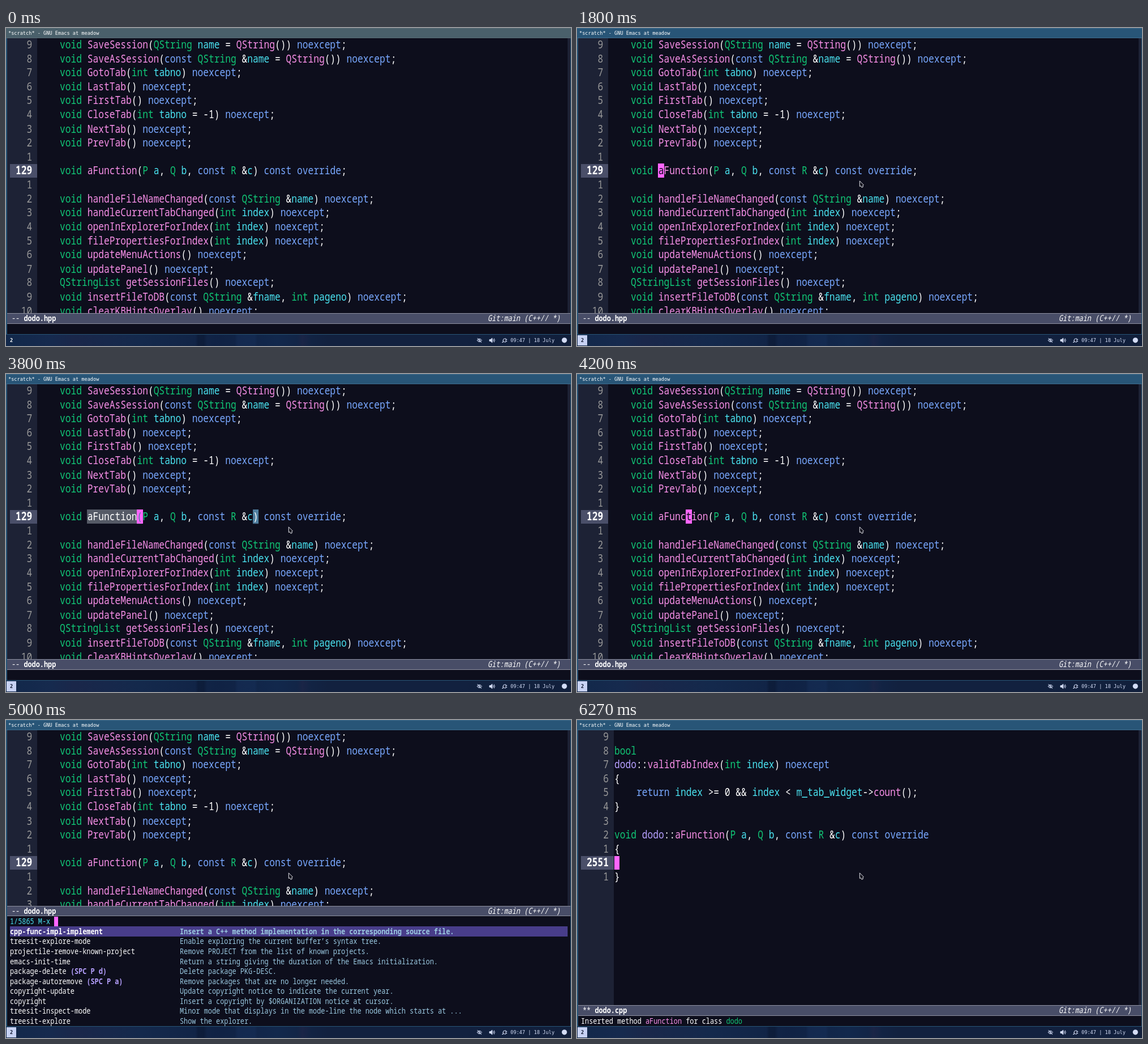
Write an HTML page that moves like this. It is 998x561 px and loops after 8 s.

```html
<!DOCTYPE html>
<html lang="en">
<head>
<meta charset="utf-8">
<title>Editor session</title>
<style>
@property --c { syntax: "<number>"; inherits: true; initial-value: 5; }

:root {
  --bg: #0d0e1c; --gutter: #1d2235; --active: #4a4f69; --frame: #285577;
  --caret: #ff66ff; --match: #4f7f9f;
  --w: 9.745px;      /* advance of one code character */
  --tall: 1.26;      /* narrow face: all editor text shares this ratio */
}
html, body { margin: 0; width: 100%; height: 100%; overflow: hidden; background: var(--bg); }
#stage { position: absolute; left: 0; top: 0; width: 998px; height: 561px; overflow: hidden; background: var(--bg); color: #fff; }
#stage div, #stage svg { position: absolute; white-space: pre; }
#stage * { font-variant-ligatures: none; }

.title { left: 0; top: 0; width: 998px; height: 18px; box-sizing: border-box;
  background: var(--frame); border: 1px solid #3d6a8b; border-width: 1px 0;
  font: 8.6px/16px "DejaVu Sans Mono", monospace; text-indent: 4px;
  animation: title 8s step-end infinite; }
.edge { top: 18px; height: 523px; width: 1.5px; background: var(--frame); }
.base { left: 0; top: 539.5px; width: 998px; height: 1.5px; background: var(--frame); }

.view { left: 1px; top: 18px; width: 996px; height: 522px; background: var(--bg); overflow: hidden; }
.view > .in { left: -1px; top: -18px; width: 998px; height: 561px; }
.gutter { left: 0; top: 18px; height: 486px; background: var(--gutter); }
.fringe { left: 992px; top: 18px; width: 6px; height: 486px; background: var(--gutter); }
.now { left: 7px; top: 240px; height: 24.4px; background: var(--active); }

.code { top: 17.4px; transform: scaleY(var(--tall)); transform-origin: 0 0;
  font: 16.242px/19.603px "Noto Sans Mono", "DejaVu Sans Mono", monospace; }
.nums { left: 0; text-align: right; color: #989898; }
.nums b { color: #fff; }
.sm { transform: scaleY(var(--tall)); transform-origin: 0 0;
  font: 11.88px/13.93px "Noto Sans Mono", "DejaVu Sans Mono", monospace; }
.bar { left: 1px; width: 996px; height: 18.5px; box-sizing: border-box;
  background: #484d67; border: 1px solid #8d90a0; border-width: 1px 0; }

.k { color: #79a8ff; } .t { color: #11c777; } .f { color: #f78fe7; }
.v { color: #4ae2f0; } .n { color: #b6a0ff; } .d { color: #9ac8e0; }

.line { left: 0; top: 176.43px; width: 600px; height: 19.603px; animation: walk 8s infinite; }
.line div { left: 0; top: 0; width: 600px; height: 19.603px; }
.line .pair { width: var(--w); background: var(--match); }
.pairs { animation: pairs 8s step-end infinite; }
.sel { background: #555a66; animation: sel 8s step-end infinite;
  clip-path: inset(0 calc(100% - var(--c) * var(--w)) 0 calc(5 * var(--w))); }
.caret { background: var(--caret); color: var(--bg);
  clip-path: inset(0 calc(100% - (var(--c) + 1) * var(--w)) 0 calc(var(--c) * var(--w)));
  animation: caret 8s step-end infinite, ink 8s step-end infinite; }
.block { background: var(--caret); }
.menu { animation: menu 8s step-end infinite; }
.done { animation: done 8s step-end infinite; }
.mouse { animation: mouse 8s step-end infinite; }

.tray { left: 0; top: 541px; width: 998px; height: 20px;
  font: 8.65px/20px "DejaVu Sans Mono", monospace; color: #d3dcf6;
  background:
    linear-gradient(90deg, #0000 33.5%, #08122966 34%, #08122966 35%, #0000 35.6%, #0000 40.5%, #1b376644 41%, #1b376644 44%, #0000 44.5%, #0000 51.5%, #2b254855 52.5%, #0000 54%),
    linear-gradient(90deg, #12284a, #162a4e 8%, #1a274a 12%, #14294c 24%, #102244 38%, #12284c 48%, #12213f 57%, #12213f 80%, #111f3b); }
.ws { left: 1px; top: 1px; width: 17px; height: 18px; line-height: 18px; text-align: center; font-weight: bold; }
.ws.on { background: #c8d3f5; animation: glow 8s infinite; }
.ws.num { animation: num 8s step-end infinite; }

@keyframes title { 0% { background-color: #4a606b; border-color: #586b74; } 5%, 100% { background-color: #285577; border-color: #3d6a8b; } }
@keyframes mouse { 0% { opacity: 0; } 1.75%, 100% { opacity: 1; } }
@keyframes num { 0% { color: #fff; } 5%, 100% { color: #0d1730; } }
@keyframes glow { 0%, 5% { opacity: 0; animation-timing-function: ease; } 10%, 100% { opacity: 1; } }
@keyframes walk {
  0% { --c: 5; }
  22.5% { --c: 5; animation-timing-function: steps(9); }
  30% { --c: 14; }
  47.5% { --c: 14; animation-timing-function: steps(3); }
  50% { --c: 11; }
  52.5% { --c: 11; animation-timing-function: steps(4, jump-both); }
  55.87%, 100% { --c: 6; }
}
@keyframes sel { 0% { opacity: 0; } 22.5% { opacity: 1; } 48.33%, 100% { opacity: 0; } }
@keyframes pairs { 0% { opacity: 0; } 30% { opacity: 1; } 52.5%, 100% { opacity: 0; } }
@keyframes ink { 0% { color: #0d0e1c; } 30% { color: #4f7f9f; } 48.33%, 100% { color: #0d0e1c; } }
@keyframes caret { 0% { opacity: 0; } 5% { opacity: 1; } 62.5% { opacity: 0; } 77.5%, 100% { opacity: 1; } }
@keyframes menu { 0% { opacity: 0; } 62.5% { opacity: 1; } 77.5%, 100% { opacity: 0; } }
@keyframes done { 0% { opacity: 0; } 78.37%, 100% { opacity: 1; } }
</style>
</head>
<body>
<div id="stage"></div>
<script>
const header = `void SaveSession(QString name = QString()) noexcept;
void SaveAsSession(const QString &name = QString()) noexcept;
void GotoTab(int tabno) noexcept;
void LastTab() noexcept;
void FirstTab() noexcept;
void CloseTab(int tabno = -1) noexcept;
void NextTab() noexcept;
void PrevTab() noexcept;

void aFunction(P a, Q b, const R &c) const override;

void handleFileNameChanged(const QString &name) noexcept;
void handleCurrentTabChanged(int index) noexcept;
void openInExplorerForIndex(int index) noexcept;
void filePropertiesForIndex(int index) noexcept;
void updateMenuActions() noexcept;
void updatePanel() noexcept;
QStringList getSessionFiles() noexcept;
void insertFileToDB(const QString &fname, int pageno) noexcept;
void clearKBHintsOverlay() noexcept;`;

const body = `
bool
dodo::validTabIndex(int index) noexcept
{
    return index >= 0 && index < m_tab_widget->count();
}

void dodo::aFunction(P a, Q b, const R &c) const override
{

}`;

const commands = [
  ["cpp-func-impl-implement", "", "Insert a C++ method implementation in the corresponding source file."],
  ["treesit-explore-mode", "", "Enable exploring the current buffer’s syntax tree."],
  ["projectile-remove-known-project", "", "Remove PROJECT from the list of known projects."],
  ["emacs-init-time", "", "Return a string giving the duration of the Emacs initialization."],
  ["package-delete", "(SPC P d)", "Delete package PKG-DESC."],
  ["package-autoremove", "(SPC P a)", "Remove packages that are no longer needed."],
  ["copyright-update", "", "Update copyright notice to indicate the current year."],
  ["copyright", "", "Insert a copyright by $ORGANIZATION notice at cursor."],
  ["treesit-inspect-mode", "", "Minor mode that displays in the mode-line the node which starts at ..."],
  ["treesit-explore", "", "Show the explorer."]
];

const esc = s => s.replace(/&/g, "&amp;").replace(/</g, "&lt;");
const span = (cls, s) => `<span class="${cls}">${s}</span>`;
const box = (cls, css, inner = "") => `<div class="${cls}" style="${css}">${inner}</div>`;

// Syntax colours: calls, class names, keywords, types, then variables.
function paint(src) {
  return src.replace(/([A-Za-z_]\w*)(\(|::)?|[&<]/g, (m, word, tail = "") => {
    if (!word) return esc(m);
    const cls = tail === "(" ? "f" : tail ? "n"
      : /^(const|noexcept|override|return)$/.test(word) ? "k"
      : /^(void|int|bool|QString|QStringList|[PQR])$/.test(word) ? "t" : "v";
    return span(cls, word) + tail;
  });
}

// One line of small text, centred on y.
const small = (x, y, html) => box("sm", `left:${x}px;top:${y - 9.2}px`, html);

const modeline = (y, flag, file) =>
  box("bar", `top:${y - 9.4}px`) +
  small(9.5, y, `${flag} <b>${file}</b>`) +
  small(850.5, y, "<i>Git:main (C++// *)</i>");

function buffer(src, current, edge) {
  const rows = src.split("\n");
  const nums = rows.map((_, i) => i === 9 ? `<b>${current}</b>` : Math.abs(i - 9)).join("\n");
  return box("gutter", `width:${edge}px`) + box("fringe", "") +
    box("now", `width:${edge - 7}px`) +
    box("code nums", `width:${edge - 9.2}px`, nums);
}

const view = (cls, inner) => box("view " + cls, "", box("in", "", inner));

const signature = esc(header.split("\n")[9]);
const pair = col => box("pair", `left:calc(${col} * var(--w))`);

const editor = view("", buffer(header, 129, 55.4) +
  box("code", "left:94.8px",
    box("line", "", box("pairs", "", pair(14) + pair(35))) +
    `<span style="position:relative">${paint(header)}</span>` +
    box("line", "", box("sel", "", signature) + box("caret", "", signature))) +
  box("", "left:0;top:503px;width:998px;height:37px;background:var(--bg)") +
  modeline(512.5, "--", "dodo.hpp"));

const rowY = i => 355.6 + 17.54 * i;
const menu = box("menu", "left:0;top:0;width:998px;height:540px",
  box("", "left:1px;top:328px;width:996px;height:212px;background:var(--bg)") +
  modeline(337.3, "--", "dodo.hpp") +
  small(7, rowY(0), span("v", "1/5865 M-x ")) +
  box("block", "left:85.3px;top:346.8px;width:7.2px;height:17.4px") +
  box("", "left:7px;top:364.2px;width:985px;height:17.6px;background:#483d8a") +
  commands.map(([name, key, doc], i) => {
    const tag = i ? "span" : "b", y = rowY(i + 1);
    const keys = key && " " + span("n", `<b>${key}</b>`);
    return small(7, y, `<${tag}>${name}</${tag}>${keys}`) +
      small(306.5, y, `<${tag} class="d">${doc}</${tag}>`);
  }).join(""));

const result = view("done", buffer(body, 2551, 65.2) +
  box("code", "left:65.5px", paint(body)) +
  box("block", "left:65.5px;top:240px;width:9.7px;height:24.4px") +
  modeline(512.5, "**", "dodo.cpp") +
  small(7, 531, `Inserted method ${span("f", "aFunction")} for class ${span("t", "dodo")}`));

const mouse = `<svg class="mouse" style="left:496px;top:267px" width="14" height="18">
  <path d="M3.3 2.8V12.4L5.500 11.600L7 14.400L9.400 13.200L8.600 10.900L10.300 9.900Z" fill="#10111c" stroke="#e8e8ee" stroke-linejoin="round"/></svg>`;

const icons = `<svg style="left:828px;top:0" width="170" height="20" fill="none" stroke="#d3dcf6" stroke-width="1">
  <path d="M4 10Q8.300 4.500 12.600 10Q8.300 15.500 4 10ZM4.500 6L12 14"/><circle cx="8.300" cy="10" r="1.500"/>
  <path d="M26 8.500h2l2.800-2.500v8l-2.800-2.500h-2Z" fill="#d3dcf6"/><path d="M32.500 8q1.500 2 0 4M34 6.500q2.600 3.500 0 7"/>
  <path d="M48 13.500h2v-3.500q0-3 3-3h2v6h-2q-3 0-3-3M55 8.500h2.200M55 11.500h2.200"/>
  <circle cx="158.300" cy="9.800" r="4.600" fill="#d3dcf6" stroke="none"/></svg>`;

document.getElementById("stage").innerHTML =
  editor + menu + result +
  box("title", "", "*scratch* - GNU Emacs at meadow") +
  box("edge", "left:0") + box("edge", "left:996.8px") + box("base", "") +
  box("tray", "", box("ws on", "") + box("ws num", "", "2") + icons +
    box("", "left:891px;top:0", "09:47 | 18 July")) +
  mouse;
</script>
</body>
</html>
```
